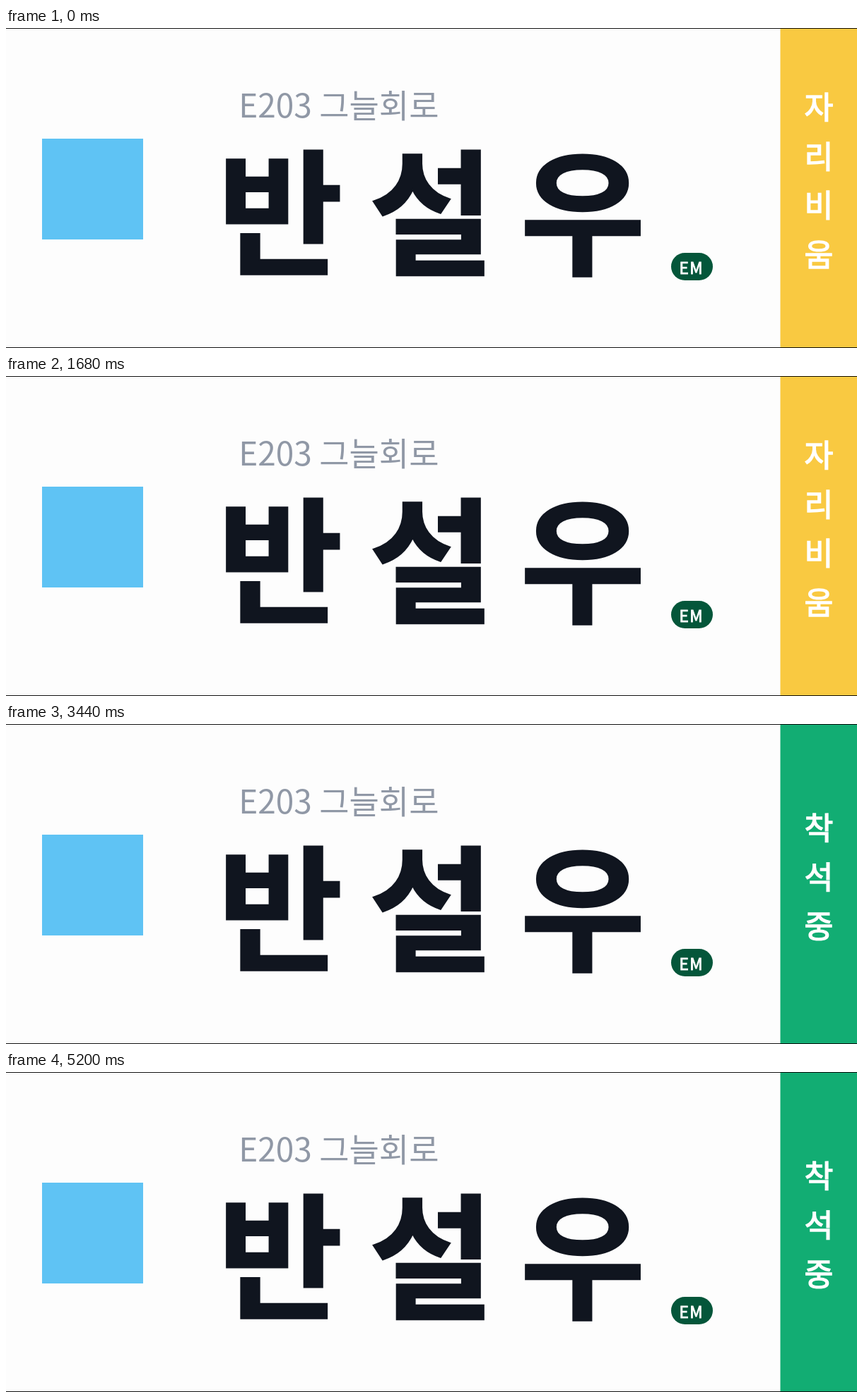
An HTML page with a canvas for the animation above (5280 ms loop, 1204x454 px).

```html
<!DOCTYPE html>
<html lang="ko">
<head>
<meta charset="utf-8">
<title>자리 상태</title>
<style>
  html, body { margin: 0; width: 100%; height: 100%; overflow: hidden; background: #fdfdfd; }
  canvas { display: block; }
</style>
</head>
<body>
<canvas id="stage" width="1204" height="454"></canvas>
<script>
const W = 1204, H = 454, LOOP = 5280, SEATED_AT = 1760;
const FONT = '"Noto Sans CJK KR", "Noto Sans KR", "Noto Sans CJK JP", "Noto Sans CJK", sans-serif';
const AWAY = { label: '자리비움', color: '#f9c941', y: 129 };
const SEATED = { label: '착석중', color: '#12ad73', y: 164 };
const ctx = document.getElementById('stage').getContext('2d');

function rect(x, y, w, h, color) {
  ctx.fillStyle = color;
  ctx.fillRect(x, y, w, h);
}

// A thin outline gives weights between the installed ones.
function text(str, x, y, { size, weight = 400, color, outline = 0, align = 'left', spacing = 0 }) {
  ctx.font = `${weight} ${size}px ${FONT}`;
  ctx.textAlign = align;
  ctx.letterSpacing = spacing + 'px';
  ctx.fillStyle = ctx.strokeStyle = color;
  ctx.fillText(str, x, y);
  if (outline) {
    ctx.lineWidth = outline;
    ctx.strokeText(str, x, y);
  }
}

function pill(x, y, w, h, color) {
  ctx.fillStyle = color;
  ctx.beginPath();
  ctx.roundRect(x, y, w, h, h / 2);
  ctx.fill();
}

function drawCard() {
  rect(0, 0, W, H, '#fdfdfd');
  rect(51, 157, 143, 143, '#5fc3f4');
  text('E203 그늘회로', 329.2, 126.5, { size: 46, color: '#9098a6' });
  const nameStyle = { size: 192.5, weight: 700, color: '#10151f', outline: 2.5, align: 'center' };
  [...'반설우'].forEach((ch, i) => text(ch, 388 + 214 * i, 334.5, nameStyle));
  pill(941, 319, 59, 39, '#04563a');
  text('EM', 952.5, 348.5, { size: 22.5, color: '#fff', outline: 0.9, spacing: 1.5 });
}

function drawStatus({ label, color, y }) {
  rect(1095.5, 0, W - 1095.5, H, color);
  const style = { size: 44.5, color: '#fff', outline: 1.4, align: 'center' };
  [...label].forEach((ch, i) => text(ch, 1150, y + 69.7 * i, style));
}

function draw(now) {
  drawCard();
  drawStatus(now % LOOP < SEATED_AT ? AWAY : SEATED);
  rect(0, 0, W, 1, '#111');
  rect(0, H - 1, W, 1, '#111');
}

ctx.lineJoin = 'miter';
ctx.miterLimit = 3;

let start;
function tick(now) {
  start ??= now;
  draw(now - start);
  requestAnimationFrame(tick);
}
draw(0);
requestAnimationFrame(tick);
</script>
</body>
</html>
```
